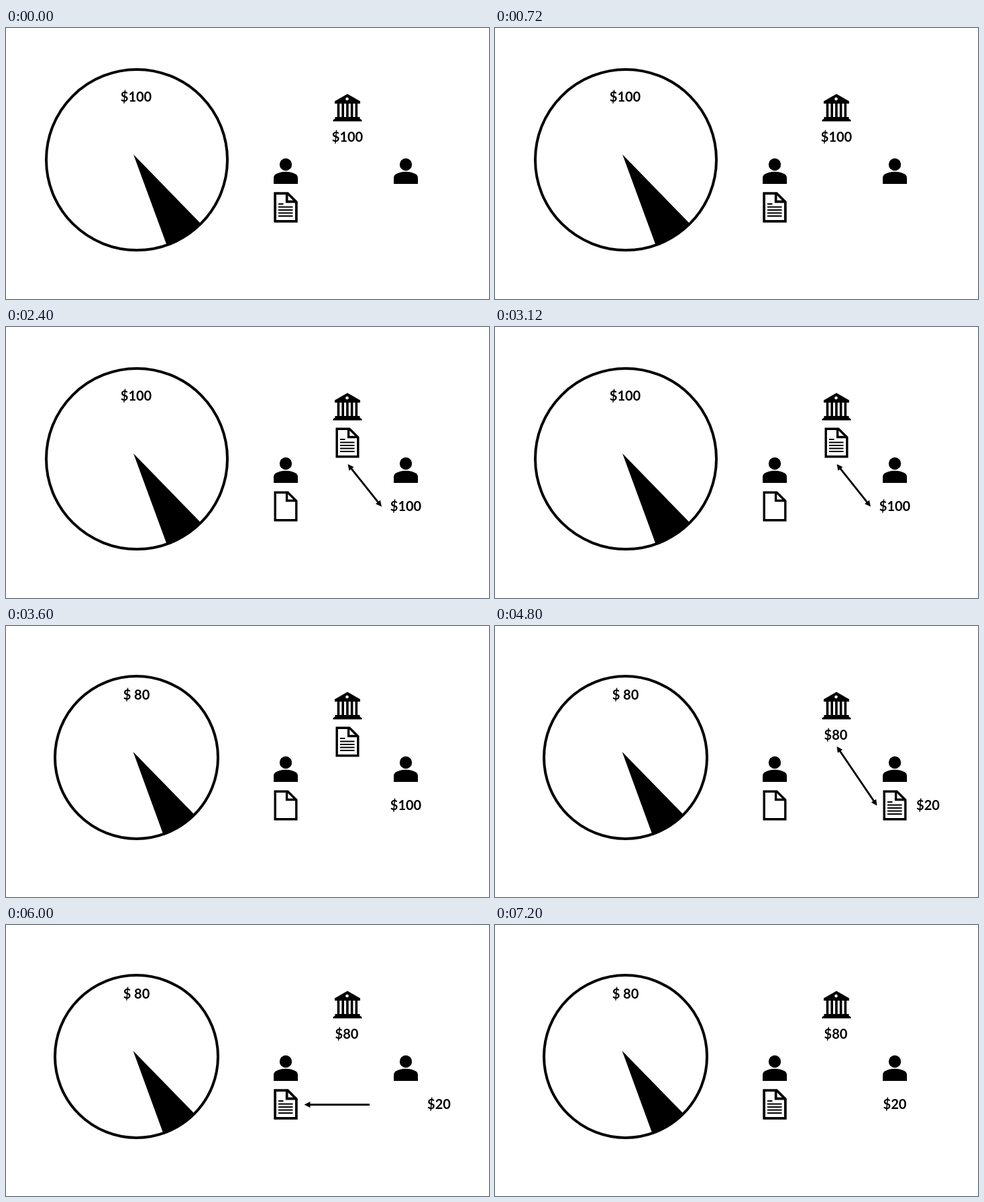
An HTML page for the animation above (8400 ms loop, 720 by 405 pixels).

```html
<!DOCTYPE html>
<html lang="en">
<head>
<meta charset="utf-8">
<title>Lending cycle</title>
<style>
  html, body { margin: 0; width: 100%; height: 100%; overflow: hidden; background: #fff; }
  svg { display: block; width: 100%; height: 100%; }
  text { font: bold 20px Lato, Carlito, sans-serif; text-anchor: middle; }
  .ring { fill: none; stroke: #000; stroke-width: 4; }
  .arrow { stroke: #000; stroke-width: 2.8; marker-end: url(#head); }
  .both { marker-start: url(#head); }
</style>
</head>
<body>
<svg viewBox="0 0 720 405">
  <defs>
    <marker id="head" markerUnits="userSpaceOnUse" markerWidth="9" markerHeight="9"
            refX="0.5" refY="4.5" orient="auto-start-reverse">
      <path d="M0 0L9 4.5L0 9Z"/>
    </marker>
    <g id="person">
      <circle cx="18" cy="9.5" r="9.2"/>
      <path d="M0 38.5V29.5C0 27 1.3 25 3 24C7 21.7 12 20.3 18 20.3S29 21.7 33 24C34.7 25 36 27 36 29.5V38.5Z"/>
    </g>
    <g id="page" fill="none" stroke="#000" stroke-width="3.4">
      <path d="M1.7 1.7H20.5L33.3 14.5V43.3H1.7Z"/>
      <path d="M19.1 1.7V14H33.3"/>
    </g>
    <g id="note">
      <use href="#page"/>
      <path d="M6.5 17.5H14M6.5 22H28M6.5 26.5H28M6.5 31H28M6.5 35.5H28" stroke="#000" stroke-width="2"/>
    </g>
  </defs>

  <g data-on="012">
    <circle class="ring" cx="195" cy="197" r="135"/>
    <path d="M190 189L291 293A145 145 0 0 1 240 325.500Z"/>
    <text x="194" y="110">$100</text>
  </g>
  <g data-on="3456">
    <circle class="ring" cx="194.500" cy="196.500" r="121.500"/>
    <path d="M189.500 188L281.500 282.500A132 132 0 0 1 235 313Z"/>
    <text x="194.500" y="110">$ 80</text>
  </g>

  <path d="M509 98.500L528 109.500V113H490V109.500Z"/>
  <circle cx="508.500" cy="106" r="2.300" fill="#fff"/>
  <path d="M495.500 113V134M502.200 113V134M508.900 113V134M515.600 113V134M522.300 113V134" stroke="#000" stroke-width="3.600"/>
  <path d="M490.500 133H527.500V135.500L530.500 137.500V139.500H487.500V137.500L490.500 135.500Z"/>

  <use href="#person" x="399" y="194.500"/>
  <use href="#person" x="578" y="194.500"/>
  <use href="#page" x="399.500" y="245.500"/>
  <use href="#note" x="399.500" y="245.500" data-on="056"/>
  <use href="#note" x="578.500" y="245.500" data-on="14"/>
  <use href="#note" x="491.500" y="150.500" data-on="23"/>

  <text x="509" y="170" data-on="01">$100</text>
  <text x="508" y="170" data-on="456">$80</text>
  <text x="596" y="275" data-on="23">$100</text>
  <text x="645.500" y="275" data-on="45">$20</text>
  <text x="596" y="275" data-on="6">$20</text>

  <path class="arrow" d="M444.500 268.500H561" data-on="1"/>
  <path class="arrow both" d="M514.800 211.700L554.700 261.800" data-on="2"/>
  <path class="arrow both" d="M514.300 187L564.700 261.500" data-on="4"/>
  <path class="arrow" d="M542 268.500H453" data-on="5"/>
</svg>
<script>
  const STEP = 1200, STEPS = 7;
  const parts = document.querySelectorAll('[data-on]');

  function draw(now) {
    const step = Math.floor(now / STEP) % STEPS;
    for (const part of parts) {
      part.style.display = part.dataset.on.includes(step) ? '' : 'none';
    }
    requestAnimationFrame(draw);
  }
  draw(performance.now());
</script>
</body>
</html>
```
